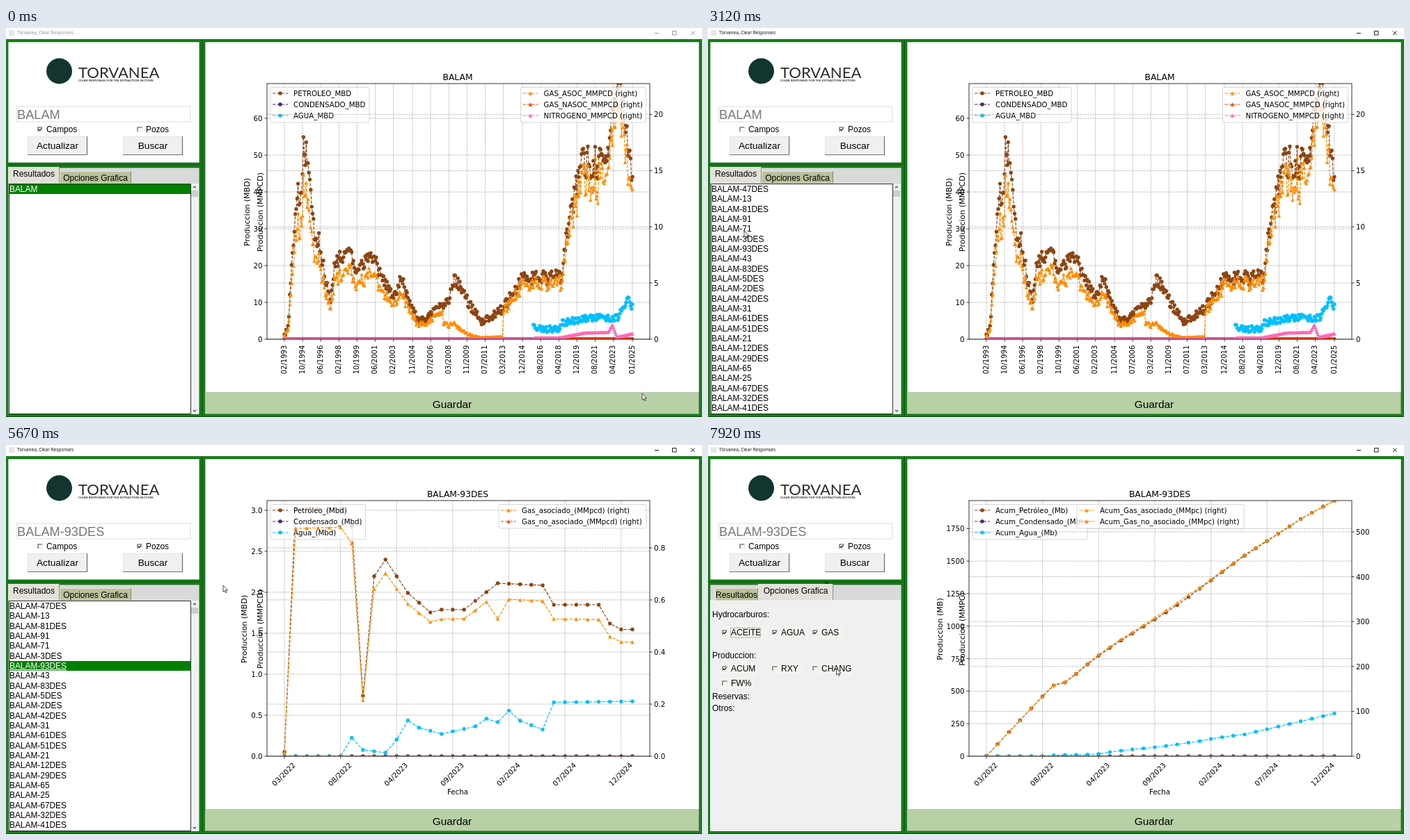
Recreate the animation shown at these times as an HTML page. Size 1000 by 560 pixels, loop 8 s.

```html
<!DOCTYPE html>
<html lang="es">
<head>
<meta charset="utf-8">
<title>Production viewer</title>
<style>
  html, body { margin: 0; width: 100%; height: 100%; overflow: hidden; background: #fff; }
  svg { display: block; width: 1000px; height: 560px; }
  .ui { font-family: "Liberation Sans", Arial, sans-serif; }
  .plot { font-family: "DejaVu Sans", sans-serif; }
  .title { font-family: "Open Sans", sans-serif; }
  .brand { font-family: Lato, sans-serif; }
</style>
</head>
<body>
<svg id="stage" viewBox="0 0 1000 560"></svg>
<script>
const LOOP = 8000;
const GREEN = '#187f1b', DARK = '#0c4f10', OLIVE = '#b9c29b';
const BROWN = '#8b4513', ORANGE = '#ff8c00', BLUE = '#00bfff';
const PURPLE = '#4b2a70', RED = '#ff4500', PINK = '#ff69b4';
const LEFT = 375, RIGHT = 925, TOP = 80, BASE = 448, FIRST = 400, SPAN = 500;

// Moments of each user action
const FOCUS = 1030, WELLS = 1160, PRESS = 1760, LISTED = 2040, SELECT = 3910,
      PLOTTED = 3990, REPLOT = 4740, OPTIONS = 6420, ACUM = 7440, TOTALS = 7560;

// ---- drawing helpers ----
const rect = (x, y, w, h, fill, extra = '') =>
  `<rect x="${x}" y="${y}" width="${w}" height="${h}" fill="${fill}" ${extra}/>`;
const path = (d, stroke, width = 1, extra = '') =>
  `<path d="${d}" fill="none" stroke="${stroke}" stroke-width="${width}" ${extra}/>`;
const text = (x, y, s, size, extra = '') =>
  `<text x="${x}" y="${(y + size * 0.36).toFixed(2)}" font-size="${size}" ${extra}>${s}</text>`;
const mid = 'text-anchor="middle"', end = 'text-anchor="end"', underline = 'text-decoration="underline"';
const turned = (x, y, s, size, angle) =>
  `<g transform="translate(${x} ${y}) rotate(${angle})">${text(0, 0, s, size, mid)}</g>`;
const during = (from, to, content) => `<g data-from="${from}" data-to="${to}">${content}</g>`;
const steps = (n, f) => Array.from({ length: n }, (_, i) => f(i));

function interp(keys, x) {
  const i = keys.findIndex(key => key[0] > x);
  if (i === 0) return keys[0][1];
  if (i < 0) return keys[keys.length - 1][1];
  const [x0, y0] = keys[i - 1], [x1, y1] = keys[i];
  return y0 + (y1 - y0) * (x - x0) / (x1 - x0);
}

function noise(seed) {
  return () => {
    seed = (seed * 16807) % 2147483647;
    return seed / 1073741823.5 - 1;
  };
}

// ---- charts ----
const r = 2.7;
const disc = ([x, y]) => `M${(x - r).toFixed(1)} ${y.toFixed(1)}a${r} ${r} 0 1 0 ${2 * r} 0a${r} ${r} 0 1 0 ${-2 * r} 0`;
const wedge = ([x, y]) => `M${x.toFixed(1)} ${(y - r).toFixed(1)}l${r} ${2 * r}h${-2 * r}z`;
const dashes = 'stroke-dasharray="4.4 1.9"';

const curve = (points, color, mark) =>
  path('M' + points.map(p => p.map(v => v.toFixed(1)).join(' ')).join('L'), color, 1.2, dashes) +
  `<path d="${points.map(mark).join('')}" fill="${color}"/>`;

function legend(x, width, entries, mark) {
  const frame = rect(x, 85.5, width, 2.5 + 16 * entries.length, '#fff',
    'rx="2" fill-opacity=".8" stroke="#ccc" stroke-opacity=".8"');
  return frame + entries.map(([label, color], i) => {
    const y = 94 + 16 * i;
    return path(`M${x + 3} ${y}h22`, color, 1.2, dashes) +
      `<path d="${mark([x + 14, y])}" fill="${color}"/>` + text(x + 33, y, label, 10.25);
  }).join('');
}

const grid = d => path(d, '#b0b0b0', 0.8, 'stroke-dasharray="2.6 1.1"');

function yAxis({ count, gap, step, digits = 0, label, labelX }, side) {
  const [x, tick, textX, anchor] = side === 'left' ? [LEFT, -3.5, 368.5, end] : [RIGHT, 3.5, 931, ''];
  return steps(count, i => {
    const y = BASE - i * gap;
    return grid(`M${LEFT} ${y}H${RIGHT}`) + path(`M${x} ${y}h${tick}`, '#000', 0.8) +
      text(textX, y + 0.3, (i * step).toFixed(digits), 10.25, anchor);
  }).join('') + turned(labelX, 265, label, 11, -90);
}

// Each series is [points, color, label]
function layer(axis, side, mark) {
  const curves = axis.series.map(([points, color]) => curve(points, color, mark)).join('');
  const entries = axis.series.map(([, color, label]) => [label, color]);
  return yAxis(axis, side) + `<g clip-path="url(#axes)">${curves}</g>` +
    legend(axis.legendX, axis.legendWidth, entries, mark);
}

const chart = (title, xTicks, left, right) =>
  '<g class="plot">' + text(649, 71, title, 12.3, mid) + xTicks +
  layer(left, 'left', disc) + layer(right, 'right', wedge) +
  rect(LEFT, TOP, RIGHT - LEFT, BASE - TOP, 'none', 'stroke="#000" stroke-width=".8"') + '</g>';

const xTick = x => grid(`M${x} ${TOP}V${BASE}`) + path(`M${x} ${BASE}v3.5`, '#000', 0.8);
const spread = n => steps(n, i => FIRST + i * SPAN / (n - 1));
const flat = xs => xs.map(x => [x, BASE]);

// Field chart: one value per month, 02/1993 to 01/2025
const months = spread(384);
const fieldTicks = spread(20).map((near, i) => {
  const m = Math.floor(i * 383 / 19), x = months[m];
  const date = `${String((m + 1) % 12 + 1).padStart(2, '0')}/${1993 + Math.floor((m + 1) / 12)}`;
  return xTick(x) + turned(x - 1, 477.5, date, 10, -90);
}).join('');

const oilTrend = [[400, 444], [406, 424], [410, 348], [418, 240], [424, 243], [427, 165], [437, 205],
  [442, 290], [450, 310], [466, 398], [473, 335], [494, 320], [504, 352], [526, 325], [536, 350],
  [556, 390], [568, 360], [576, 386], [593, 424], [621, 404], [636, 395], [645, 360], [665, 397],
  [684, 424], [714, 404], [741, 362], [798, 358], [808, 280], [828, 192], [862, 195], [876, 80],
  [882, 88], [900, 227]];
const waterTrend = [[757, 432], [792, 434], [800, 424], [836, 417], [880, 417], [893, 388], [900, 402]];
const nitroTrend = [[755, 448], [760, 446], [795, 446], [830, 439], [865, 438], [871, 427], [878, 445], [900, 440]];
const gasShare = x => x < 628 ? 0.79 : x < 714 ? 0.08 + 0.42 * Math.exp((628 - x) / 20) : 0.9;

const rough = noise(4127);
const oil = months.map(x => {
  const y = interp(oilTrend, x);
  return [x, Math.min(446, y + rough() * (3 + (BASE - y) * 0.08))];
});
const gas = oil.map(([x, y]) => [x, BASE - (BASE - y) * gasShare(x) * (1 + rough() * 0.06)]);
const water = months.filter(x => x >= 757).map(x => [x, interp(waterTrend, x) + rough() * 5]);
const nitro = months.map(x => [x, interp(nitroTrend, x)]);

const fieldChart = chart('BALAM', fieldTicks, {
  label: 'Produccion (MBD)', labelX: 346, count: 7, gap: 53, step: 10, legendX: 380, legendWidth: 142,
  series: [[oil, BROWN, 'PETROLEO_MBD'], [flat(months), PURPLE, 'CONDENSADO_MBD'], [water, BLUE, 'AGUA_MBD']]
}, {
  label: 'Produccion (MMPCD)', labelX: 365, count: 5, gap: 80.9, step: 5, legendX: 739.5, legendWidth: 180,
  series: [[gas, ORANGE, 'GAS_ASOC_MMPCD (right)'], [flat(months), RED, 'GAS_NASOC_MMPCD (right)'],
    [nitro, PINK, 'NITROGENO_MMPCD (right)']]
});

// Well charts: 32 monthly rates and their running totals
const wellXs = spread(32);
const wellLine = trend => wellXs.map((x, i) => [x, interp(trend, i)]);
const wellOil = wellLine([[0, 442], [1, 92], [5, 92], [6, 117], [7, 361], [8, 189], [9, 165], [11, 213],
  [13, 241], [14, 237], [16, 237], [19, 199], [23, 202], [24, 230], [28, 230], [29, 257], [30, 265.5]]);
const wellWater = wellLine([[5, 448], [6, 421.5], [7, 439], [9, 443], [10, 424], [11, 396.5], [12, 407],
  [14, 416], [17, 405], [18, 394], [19, 399], [20, 382.5], [21, 397], [23, 409.5], [24, 370.5], [31, 369]]);
const wellShare = [[0, 0.92], [18, 0.94], [19, 0.795], [20, 0.91], [31, 0.9]];
const wellGas = wellOil.map(([x, y], i) => [x, BASE - (BASE - y) * interp(wellShare, i)]);

const sumOf = points => points.reduce((sum, [, y]) => sum + BASE - y, 0);
function total(points, scale) {
  let sum = 0;
  return points.map(([x, y]) => [x, BASE - (sum += BASE - y) * scale]);
}
const fill = points => (BASE - TOP) / sumOf(points);

const [firstTick, ...otherTicks] =
  ['03/2022', '08/2022', '04/2023', '09/2023', '02/2024', '07/2024', '12/2024'].map((date, i) =>
    xTick(wellXs[i * 5]) + turned(wellXs[i * 5] - 1, 474, date, 10.25, -45));
const wellTicks = firstTick + during(REPLOT, LOOP, otherTicks.join('')) + text(649, 499, 'Fecha', 10.25, mid);

const rateChart = chart('BALAM-93DES', wellTicks, {
  label: 'Produccion (MBD)', labelX: 342, count: 7, gap: 59, step: 0.5, digits: 1, legendX: 380, legendWidth: 136.5,
  series: [[wellOil, BROWN, 'Petróleo_(Mbd)'], [flat(wellXs), PURPLE, 'Condensado_(Mbd)'],
    [wellWater, BLUE, 'Agua_(Mbd)']]
}, {
  label: 'Produccion (MMPCD)', labelX: 365, count: 5, gap: 75, step: 0.2, digits: 1, legendX: 708, legendWidth: 212,
  series: [[wellGas, ORANGE, 'Gas_asociado_(MMpcd) (right)'], [flat(wellXs), RED, 'Gas_no_asociado_(MMpcd) (right)']]
});

const totalChart = chart('BALAM-93DES', wellTicks, {
  label: 'Produccion (MB)', labelX: 333, count: 8, gap: 46.8, step: 250, legendX: 380, legendWidth: 165,
  series: [[total(wellOil, fill(wellOil)), BROWN, 'Acum_Petróleo_(Mb)'],
    [flat(wellXs), PURPLE, 'Acum_Condensado_(Mb)'], [total(wellWater, fill(wellOil)), BLUE, 'Acum_Agua_(Mb)']]
}, {
  label: 'Produccion (MMPC)', labelX: 365, count: 6, gap: 64.6, step: 100, legendX: 530, legendWidth: 240,
  series: [[total(wellGas, fill(wellGas)), ORANGE, 'Acum_Gas_asociado_(MMpc) (right)'],
    [flat(wellXs), '#ff7f0e', 'Acum_Gas_no_asociado_(MMpc) (right)']]
});

// ---- window and controls ----
const titleBar = color =>
  `<g class="title" fill="${color}">${text(16, 7, 'Torvanea, Clear Responses', 6.5)}</g>` +
  path('M932 7.5h6M957.5 4.5h5.5v5.5h-5.5zM984 4.5l5.5 5.5M989.5 4.5l-5.5 5.5', color, 0.9);

const tick = (x, y) => path(`M${x - 2} ${y}l1.5 1.7l3-3.4`, '#000', 1.2);
const check = (x, y, label, size = 11.9) =>
  rect(x - 3, y - 3, 7, 7, '#fff') + path(`M${x - 3} ${y + 3}v-6h6.5`, '#444', 1.1) +
  path(`M${x - 2} ${y + 3.5}h5.5v-6`, '#e3e3e3', 0.8) + text(x + 9, y, label, size);

function button(x, label, sunk = false) {
  const [light, shade, shift] = sunk ? ['#666', '#fff', 1] : ['#e4e4e4', '#6e6e6e', 0];
  return rect(x, 156, 86, 27, '#f0f0f0') + path(`M${x + 0.5} 183v-26.5h85`, light) +
    path(`M${x} 182.5h85.5v-26.5`, shade, 1.2) + text(x + 43 + shift, 169.5 + shift, label, 13.7, mid);
}

const tab = (x, y, w, color, label) =>
  rect(x, y, w, 223.5 - y, color) + path(`M${x + 0.5} 223V${y + 0.5}h${w - 1}`, '#efefe8', 0.8) +
  path(`M${x + w - 0.5} ${y}V223`, '#777', 0.8) + text(x + w / 2, y + 9.5, label, 12, mid);

const wellNames = ('47DES 13 81DES 91 71 3DES 93DES 43 83DES 5DES 2DES 42DES 31 61DES 51DES 21 ' +
  '12DES 29DES 65 25 67DES 32DES 41DES').split(' ').map(id => 'BALAM-' + id);
const rowY = i => 231.7 + i * 14.34;
const row = (name, i) => text(5, rowY(i), name, 11.9);
const selectedRow = (name, i, decoration = '') =>
  rect(5, Math.round(rowY(i) - 7), 260, 14, '#008000') + `<g fill="#fff" ${decoration}>${row(name, i)}</g>`;

const resultsTab = tab(77, 206, 103, OLIVE, 'Opciones Grafica') + tab(3, 200, 74, '#e2e0d8', 'Resultados') +
  rect(4, 224, 261, 332, '#fff') +
  rect(266, 224, 11, 332, '#f0f0f0') + rect(266, 234, 10, 9, '#cdcdcd') +
  path('M269 230l2-2l2 2M269 550l2 2l2-2', '#444', 1.1) +
  during(0, FOCUS, selectedRow('BALAM', 0)) + during(FOCUS, LISTED, selectedRow('BALAM', 0, underline)) +
  during(LISTED, LOOP, wellNames.map(row).join('')) +
  during(SELECT, LOOP, selectedRow(wellNames[6], 6, underline)) +
  path('M4.5 556V224.5H265.5V555.5H4', '#333', 1);

const optionRows = { 270: ['ACEITE', 'AGUA', 'GAS'], 322: ['ACUM', 'RXY', 'CHANG'], 343: ['FW%'] };
const columns = [24, 96, 154];
const optionBoxes = Object.entries(optionRows).map(([y, labels]) =>
  labels.map((label, i) => rect(columns[i] - 5, y - 8, 24 + label.length * 7, 16, '#f4f4ee') +
    check(columns[i], +y, label, 12)).join('')).join('');
const headings = Object.entries({ 'Hydrocarburos:': 244, 'Produccion:': 303, 'Reservas:': 362, 'Otros:': 379 })
  .map(([label, y]) => text(6, y, label, 12)).join('');

const optionsTab = rect(3, 223, 274, 333, '#f0f0f0') + tab(10, 206, 62, OLIVE, 'Resultados') +
  tab(72, 200, 108, '#e2e0d8', 'Opciones Grafica') + headings + optionBoxes +
  columns.map(x => tick(x, 270)).join('') + during(ACUM, LOOP, tick(24, 322)) +
  rect(32.5, 263.5, 42.5, 13.5, 'none', 'stroke="#333" stroke-width=".7" stroke-dasharray="1 1"') +
  rect(168, 197.5, 5, 2, '#10301a');

const edge = `stroke="${DARK}" stroke-width=".6"`;
const controls = rect(3, 20, 275, 174, '#fff', edge) +
  '<circle cx="76.5" cy="62" r="18.5" fill="#12352f"/>' +
  `<g class="brand" fill="#2b2b2b">${text(104, 64, 'TORVANEA', 22)}` +
  `${text(104, 75.5, 'CLEAR RESPONSES FOR THE EXTRACTION SECTORS', 4.4, 'font-weight="700"')}</g>` +
  rect(15.5, 113, 249.5, 22, '#fff', 'stroke="#ddd"') +
  `<g fill="#777">${during(0, SELECT, text(16, 124.5, 'BALAM', 18.2))}` +
  `${during(SELECT, LOOP, text(16, 124.5, 'BALAM-93DES', 18.2))}</g>` +
  check(49, 146, 'Campos') + check(192, 146, 'Pozos') +
  during(0, WELLS, tick(49, 146)) + during(WELLS, LOOP, tick(192, 146)) +
  button(31, 'Actualizar') + button(168, 'Buscar') + during(PRESS, LISTED, button(168, 'Buscar', true));

const clicks = [[FOCUS, WELLS], [PRESS, LISTED], [3660, SELECT], [4260, 4410], [6360, OPTIONS], [7310, ACUM]]
  .map(([from, to]) => during(from, to, '<circle r="6.5" fill="#ff0" fill-opacity=".47"/>')).join('');
const arrow = '<path d="M0 0V9.5L2.2 7.5L3.7 10.8L5 10.2L3.6 7H6.5Z" fill="#fff" stroke="#222" stroke-width=".8"/>';

const stage = document.getElementById('stage');
stage.innerHTML =
  `<defs><clipPath id="axes">${rect(LEFT, TOP, RIGHT - LEFT, BASE - TOP, '#fff')}</clipPath></defs>` +
  rect(0, 0, 1000, 560, '#fff') + rect(4, 3, 8, 8, '#e4e6e8') +
  during(0, FOCUS, titleBar('#8c8c8c')) + during(FOCUS, LOOP, titleBar('#000')) +
  rect(0, 16, 1000, 544, GREEN) + path('M0 197H280M282 16V560M0 559.5H1000', DARK, 1.2) +
  `<g class="ui">${controls}${rect(3, 201, 275, 355, '#d9d9d9', edge)}` +
  during(0, OPTIONS, resultsTab) + during(OPTIONS, LOOP, optionsTab) +
  rect(286, 20, 710, 505, '#fff', edge) + rect(286, 525, 710, 31, '#b7d0a5') +
  path('M286 555.5H995.5V525', '#7d9270') + text(641, 541, 'Guardar', 15.4, mid) + '</g>' +
  during(0, PLOTTED, fieldChart) + during(PLOTTED, TOTALS, rateChart) + during(TOTALS, LOOP, totalChart) +
  `<g id="cursor">${arrow}${clicks}</g>`;

// ---- motion: the pointer leaves at the first time and arrives at the second ----
const moves = [
  [70, 700, 210, 148], [1200, 1400, 217, 168], [2440, 2860, 50, 288], [3060, 3120, 52, 292],
  [3170, 3510, 61.5, 316], [5350, 5670, 312, 202], [5780, 5910, 522, 140], [5910, 5990, 420, 354],
  [5990, 6090, 268, 262], [6180, 6350, 168, 197], [6420, 6480, 156, 207], [6620, 6810, 140, 257],
  [6840, 7110, 49, 322], [7600, 7920, 184.5, 321.5]
];

function pointerAt(t) {
  let x = 914, y = 526;
  for (const [from, to, toX, toY] of moves) {
    const k = Math.min(1, Math.max(0, (t - from) / (to - from)));
    x += (toX - x) * k;
    y += (toY - y) * k;
  }
  return [x, y];
}

const cursor = document.getElementById('cursor');
const timed = [...stage.querySelectorAll('[data-from]')]
  .map(node => ({ node, from: +node.dataset.from, to: +node.dataset.to }));

function render(t) {
  for (const { node, from, to } of timed) node.style.display = t >= from && t < to ? '' : 'none';
  const [x, y] = pointerAt(t);
  cursor.setAttribute('transform', `translate(${x.toFixed(1)} ${y.toFixed(1)})`);
}

const start = performance.now();
function frame() {
  render((performance.now() - start) % LOOP);
  requestAnimationFrame(frame);
}
frame();
</script>
</body>
</html>
```
